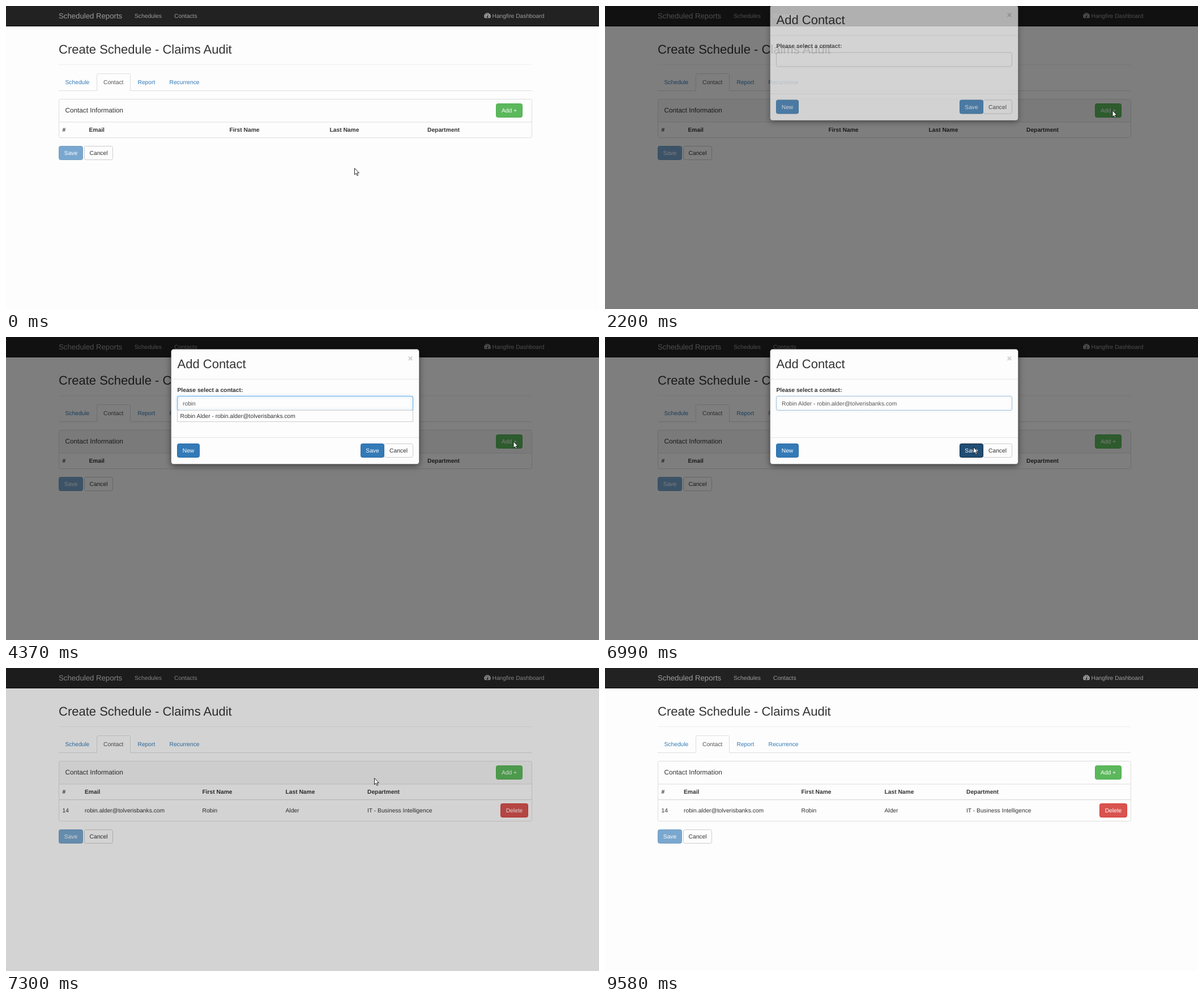
Recreate the animation shown at these times as an HTML page. Size 1047 px wide and 535 px high, loop 9.68 s.

```html
<!DOCTYPE html>
<html lang="en">
<head>
<meta charset="utf-8">
<title>Scheduled Reports</title>
<style>
html, body { margin: 0; width: 100%; height: 100%; overflow: hidden; background: #fdfdfd; }
svg { display: block; }
text {
  font: 10.27px "Liberation Sans", Arial, sans-serif;
  fill: #333; text-rendering: geometricPrecision; white-space: pre;
}
.b { font-weight: bold; }
.h { font-size: 22px; }
.m { text-anchor: middle; }
.w { fill: #fff; }
.nav text { fill: #9d9d9d; }
.nav .brand { font-size: 13.2px; }
.link { fill: #337ab7; }
.tab, .field { fill: #555; }
.title { font-size: 11.73px; }
.line { fill: none; stroke: #ddd; }
.success { fill: #5cb85c; stroke: #4cae4c; }
.success.hover { fill: #449d44; stroke: #398439; }
.success.focus { fill: #449d44; stroke: #255625; }
.success.active { fill: #398439; stroke: #255625; }
.primary { fill: #337ab7; stroke: #2e6da4; }
.primary.hover { fill: #286090; stroke: #204d74; }
.primary.active { fill: #204d74; stroke: #122b40; }
.danger { fill: #d9534f; stroke: #d43f3a; }
.plain { fill: #fdfdfd; stroke: #ccc; }
.close { font-size: 15.4px; font-weight: bold; opacity: .2; fill: #000; }
#sheet { fill: #fdfdfd; stroke: rgba(0,0,0,.25); filter: drop-shadow(0 3.7px 5.5px rgba(0,0,0,.5)); }
#glow { fill: none; stroke: #66afe9; filter: drop-shadow(0 0 2.5px rgba(102,175,233,.8)); }
</style>
</head>
<body>
<svg id="stage" width="1047" height="535" viewBox="0 0 1047 535"></svg>
<script>
const FIRST = 'Robin', LAST = 'Alder', MAIL = 'robin.alder@tolverisbanks.com';
const QUERY = FIRST.toLowerCase(), CHOICE = `${FIRST} ${LAST} - ${MAIL}`;

// Text is placed by its vertical centre.
const text = (x, mid, s, cls = '', size = 10.27, id = '') =>
  `<text id="${id}" x="${x}" y="${mid + size * .3465}" class="${cls}">${s}</text>`;
const rect = (x, y, x2, y2, cls = '', id = '', r = 2.9) =>
  `<rect id="${id}" x="${x + .5}" y="${y + .5}" width="${x2 - x - 1}" height="${y2 - y - 1}" rx="${r}" class="${cls}"/>`;
const line = (x, y, x2, color) => `<path d="M${x} ${y}H${x2}" class="line" style="stroke:${color}"/>`;
const button = (x, y, x2, label, cls, id) =>
  rect(x, y, x2, y + 25, cls, id) +
  text((x + x2) / 2, y + 12.5, label, cls == 'plain' ? 'm' : 'm w');
const header = xs => ['#', 'Email', 'First Name', 'Last Name', 'Department']
  .map((s, i) => text(xs[i], 218.5, s, 'b')).join('');

const cols = [99.5, 139, 346.5, 493.5, 638];
const record = [14, MAIL, FIRST, LAST, 'IT - Business Intelligence'];

const page = `
  <rect width="1047" height="535" fill="#fdfdfd"/>
  <g class="nav">
    <rect width="1047" height="36" fill="#222"/><rect y="35" width="1047" height="1" fill="#080808"/>
    ${text(93, 17, 'Scheduled Reports', 'brand', 13.2)}
    ${text(227, 17, 'Schedules')}${text(297, 17, 'Contacts')}${text(858.5, 17, 'Hangfire Dashboard')}
    <path d="M845.2 21.3A5.8 5.8 0 1 1 854.8 21.3Z" fill="#9d9d9d"/>
    <path d="M850 19.2L851.3 14.6M845.8 18h1.4M852.8 18h1.4M847 14.8h1.3M849.4 13.6h1.2" stroke="#222" fill="none"/>
    <circle cx="850" cy="19.2" r="1.3" fill="#222"/>
  </g>
  ${text(93, 76.5, 'Create Schedule - Claims Audit', 'h', 22)}
  ${line(93, 103.5, 928, '#eee')}
  <path class="line" d="M93 149.5H160.5V122q0-2.5 2.5-2.5H217q2.5 0 2.5 2.5V149.5H928"/>
  ${text(104.5, 134, 'Schedule', 'link')}${text(172, 134, 'Contact', 'tab')}
  ${text(232.5, 134, 'Report', 'link')}${text(288.5, 134, 'Recurrence', 'link')}
  <rect id="heading" x="94" y="165" width="834" height="40"/>
  ${line(94, 205, 928, '#ddd')}
  ${text(104.5, 184.3, 'Contact Information', 'title', 11.73)}
  ${button(865, 172, 912, 'Add +', 'success', 'add')}
  <g id="empty">${rect(93, 164, 929, 233, 'line')}${header([99.5, 146.5, 394.5, 571.5, 744])}</g>
  <g id="filled">
    ${rect(93, 164, 929, 271, 'line')}${header(cols)}
    <path class="line" stroke-width="1.5" d="M94 232.5H928"/>
    ${record.map((s, i) => text(cols[i], 251.5, s)).join('')}
    ${button(873, 239, 922, 'Delete', 'danger', '')}
  </g>
  <g id="actions">
    <g opacity=".65">${button(93, 247, 136, 'Save', 'primary', '')}</g>
    ${button(138, 247, 189, 'Cancel', 'plain', '')}
  </g>`;

const dialog = `
  ${rect(291, 21, 730, 225, '', 'sheet', 4.4)}
  ${text(302.5, 47, 'Add Contact', 'h', 22)}${text(714, 38, '×', 'm close', 15.4)}
  ${line(292, 74.5, 729, '#e5e5e5')}
  ${text(302.5, 93, 'Please select a contact:', 'b')}
  ${rect(302, 104, 719, 130, 'plain')}${rect(302, 104, 719, 130, '', 'glow')}
  ${text(312, 117, '', 'field', 10.27, 'value')}
  <rect id="caret" y="111" width="1" height="12" fill="#333"/>
  <g id="list">
    ${rect(302, 129, 719, 150, 'plain', '', 0)}
    <rect id="mark" x="303" y="130" width="411" height="19" fill="#cdcdcd"/>
    ${text(307.5, 139.5, CHOICE)}
  </g>
  ${line(292, 177.5, 729, '#e5e5e5')}
  ${button(302, 188, 342, 'New', 'primary', '')}
  ${button(667, 188, 719, 'Cancel', 'plain', '')}
  ${button(626, 188, 668, 'Save', 'primary', 'save')}`;

document.getElementById('stage').innerHTML = `${page}
  <rect id="shade" width="1047" height="535"/>
  <g id="dialog">${dialog}</g>
  <path id="cursor" d="M.5 .5V11.8L3.1 9.4L4.9 13.5L6.7 12.7L4.9 8.7H8.4Z" fill="#fff" stroke="#111" stroke-width=".9"/>`;

const $ = id => document.getElementById(id);
const ramp = (t, start, length) => Math.min(1, Math.max(0, (t - start) / length));
const smooth = u => u * u * (3 - 2 * u);
const easeOut = u => 1 - (1 - u) ** 2;
const within = (t, ...spans) => spans.some(([a, b]) => t >= a && t < b);
const show = (id, on) => $(id).style.display = on ? '' : 'none';
const mix = (a, b, u) => a.map((v, i) => v + (b[i] - v) * u);

const START = [615, 286], ADD = [895.5, 184], SAVE = [650, 194], EXIT = [624, 540];

function cursorAt(t) {
  if (t < 6250) return mix(START, ADD, smooth(ramp(t, 310, 960)));
  if (t < 7700) return mix(ADD, SAVE, smooth(ramp(t, 6250, 400)));
  return mix(SAVE, EXIT, ramp(t, 7725, 285) ** 1.4);
}

function addState(t, x, y) {
  if (within(t, [1800, 1900])) return 'active';
  if (within(t, [1900, 2100], [7450, 9580])) return 'focus';
  return t < 1800 && x >= 865 && y < 197 ? 'hover' : '';
}

function draw(t) {
  const [x, y] = cursorAt(t);
  $('cursor').setAttribute('transform', `translate(${x} ${y})`);
  show('cursor', t < 8010);

  const shade = ramp(t, 1925, 150) - ramp(t, 7200, 150);
  $('shade').setAttribute('opacity', shade / 2);
  $('heading').setAttribute('fill', shade > 0 ? '#f5f5f5' : '#fdfdfd');
  $('add').setAttribute('class', 'success ' + addState(t, x, y));

  const saved = t >= 7100;
  show('empty', !saved);
  show('filled', saved);
  $('actions').setAttribute('transform', `translate(0 ${saved ? 38 : 0})`);

  const lift = 1 - easeOut(ramp(t, 2100, 300)) + easeOut(ramp(t, 7050, 300));
  $('dialog').setAttribute('opacity', ramp(t, 2100, 150) - ramp(t, 7050, 150));
  $('dialog').setAttribute('transform', `translate(0 ${-51 * lift})`);
  show('dialog', within(t, [2100, 7200]));
  $('glow').setAttribute('opacity', ramp(t, 2300, 150) - ramp(t, 6900, 150));
  const over = t >= 6250 && x < 668 && y > 188;
  $('save').setAttribute('class', 'primary ' + (t >= 6900 ? 'active' : over ? 'hover' : ''));

  const typed = t < 3330 ? 0 : Math.floor((t - 3330) / 72) + 1;
  const value = t < 4830 ? QUERY.slice(0, typed) : CHOICE;
  if ($('value').textContent !== value) $('value').textContent = value;
  show('caret', within(t, [2300, 2830], [3330, 4150], [4650, 5350], [5880, 6410]));
  $('caret').setAttribute('x', Math.round(312 + (value ? $('value').getComputedTextLength() : 0)));
  show('list', within(t, [4000, 5170]));
  show('mark', t >= 4830);
}

const begin = performance.now();
function tick() {
  draw((performance.now() - begin) % 9680);
  requestAnimationFrame(tick);
}
tick();
</script>
</body>
</html>
```
